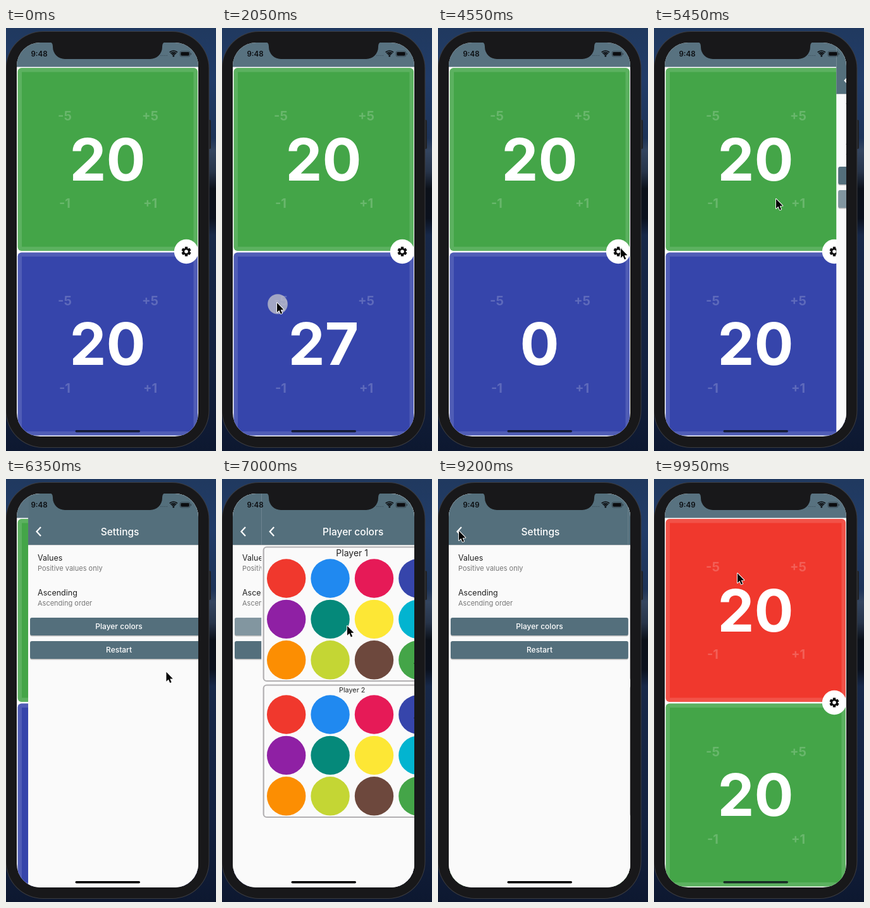
An HTML page with a canvas for the animation above (10000 ms loop, 332x668 px).

```html
<!DOCTYPE html>
<html lang="en">
<head>
<meta charset="utf-8">
<title>Life counter</title>
<style>
html, body { margin: 0; width: 100%; height: 100%; overflow: hidden; background: #14213d; }
canvas { display: block; width: 332px; height: 668px; }
</style>
</head>
<body>
<canvas id="stage"></canvas>
<script>
const W = 332, H = 668, LOOP = 10000;
const canvas = document.getElementById('stage');
const ctx = canvas.getContext('2d');
const ratio = window.devicePixelRatio || 1;
canvas.width = W * ratio;
canvas.height = H * ratio;

const SLATE = '#546f7c', PAPER = '#fafafa';
const RED = '#f0382d', INDIGO = '#3645ab', GREEN = '#44a548';
const PALETTE = [
  RED, '#2089f0', '#e61a57', INDIGO,
  '#8f20a4', '#05897a', '#fde735', '#02b4d0',
  '#fc8e02', '#c4d634', '#6d483d', GREEN
];
const SCREEN = { x: 17, y: 23, w: 287, h: 622 };
const BRUSH = new Path2D('M7 14c-1.66 0-3 1.34-3 3 0 1.31-1.16 2-2 2 .92 1.22 2.49 2 4 2 2.21 0 4-1.79 4-4 0-1.66-1.34-3-3-3z' +
  'm13.71-9.37l-1.34-1.34c-.39-.39-1.02-.39-1.41 0L9 12.25 11.75 15l8.96-8.96c.39-.39.39-1.02 0-1.41z');

// Pointer stops: time, x, y
const POINTER = [
  [150, 300, 480], [600, 228, 433], [790, 228, 433], [1020, 228, 568], [1400, 228, 568],
  [1900, 87, 434], [3200, 87, 434], [3440, 92, 568], [3860, 92, 568],
  [4400, 289, 348], [4710, 289, 348], [5010, 193, 270], [5500, 193, 270],
  [5950, 288, 350], [6140, 288, 350], [6640, 198, 232], [7020, 198, 232],
  [7400, 56, 155], [7560, 56, 155], [7960, 264, 499], [8080, 264, 499],
  [8450, 172, 182], [8750, 33, 82], [9440, 33, 82], [9900, 132, 149]
];
// Presses: time, change of the lower counter on release
const HOLD = 90;
const PRESSES = [
  [650, 5], [1050, 1], [1290, 1],
  [2000, -5], [2270, -5], [2540, -5], [2810, -5], [3080, -5],
  [3480, -1], [3720, -1],
  [4600, 0], [5110, 0], [6020, 0], [6725, 0], [7440, 0], [7990, 0], [8800, 0], [9310, 0]
];
const RESET = 5200, PICK_ONE = 7530, PICK_TWO = 8080, NEW_MINUTE = 7600;
const SETTINGS_VISITS = [[4690, 5203], [6110, 9400]];
const COLOR_VISITS = [[6817, 8890]];

const clamp = v => Math.max(0, Math.min(1, v));
const easeOut = u => 1 - (1 - clamp(u)) ** 3;
const smooth = u => u * u * (3 - 2 * u);

// Left offset of a page that slides in from the right
function pageOffset(t, visits) {
  const slide = 400;
  for (const [enter, leave] of visits) {
    if (t < enter || t > leave + slide) continue;
    const closed = t < leave ? 1 - easeOut((t - enter) / slide) : easeOut((t - leave) / slide);
    return closed * SCREEN.w;
  }
  return null;
}

function pointerAt(t) {
  if (t < POINTER[0][0]) return null;
  const i = POINTER.findIndex(stop => stop[0] > t);
  if (i < 0) return POINTER[POINTER.length - 1].slice(1);
  const [t0, x0, y0] = POINTER[i - 1], [t1, x1, y1] = POINTER[i];
  const u = smooth((t - t0) / (t1 - t0));
  return [x0 + (x1 - x0) * u, y0 + (y1 - y0) * u];
}

function lowerCount(t) {
  if (t >= RESET) return 20;
  return PRESSES.reduce((sum, [at, step]) => t >= at + HOLD ? sum + step : sum, 20);
}

function rect(x, y, w, h, color, radius = 0) {
  ctx.beginPath();
  ctx.roundRect(x, y, w, h, radius);
  ctx.fillStyle = color;
  ctx.fill();
}

function disc(x, y, r, color) {
  ctx.beginPath();
  ctx.arc(x, y, r, 0, Math.PI * 2);
  ctx.fillStyle = color;
  ctx.fill();
}

function line(points, color, width) {
  ctx.beginPath();
  points.forEach(([x, y]) => ctx.lineTo(x, y));
  ctx.strokeStyle = color;
  ctx.lineWidth = width;
  ctx.stroke();
}

// Places text with its capitals centred on y
function label(text, x, y, size, color, weight = 400, align = 'center') {
  ctx.font = `${weight} ${size}px Inter, sans-serif`;
  ctx.textAlign = align;
  ctx.fillStyle = color;
  ctx.fillText(text, x, y + size * 0.364);
}

function gradient(stops) {
  const g = ctx.createLinearGradient(0, 0, 0, H);
  stops.forEach(([at, color]) => g.addColorStop(at, color));
  return g;
}

function drawPhone() {
  rect(0, 0, W, H, gradient([
    [0, '#20395f'], [0.12, '#213c68'], [0.26, '#1d3357'], [0.29, '#34455f'], [0.34, '#273449'],
    [0.38, '#0c1119'], [0.45, '#0b111d'], [0.49, '#172848'], [0.8, '#13213f'], [1, '#0d1830']
  ]));
  rect(319, 145, 5, 46, '#202226', 2);
  rect(-0.5, 5, 322, 658, '#3b3c40', 59);
  rect(0.5, 6, 320, 656, '#18181a', 58);
}

function drawGear(x, y) {
  ctx.beginPath();
  for (let i = 0; i < 6; i++) {
    const a = i * Math.PI / 3 + Math.PI / 6;
    [[-0.46, 5.4], [-0.27, 7.8], [0.27, 7.8], [0.46, 5.4]].forEach(([da, r]) =>
      ctx.lineTo(x + r * Math.cos(a + da), y + r * Math.sin(a + da)));
  }
  ctx.closePath();
  ctx.moveTo(x + 2.8, y);
  ctx.arc(x, y, 2.8, 0, Math.PI * 2);
  ctx.fillStyle = '#0b0b0b';
  ctx.fill('evenodd');
}

function drawCard(y, color, count) {
  rect(18.5, y, 284.5, 289, color, 6);
  ctx.beginPath();
  ctx.roundRect(18.5, y, 284.5, 289, 6);
  ctx.rect(25, y + 6.5, 271.5, 276);
  ctx.fillStyle = 'rgba(255,255,255,.13)';
  ctx.fill('evenodd');
  const faint = 'rgba(255,255,255,.2)';
  for (const [dy, step] of [[76, 5], [214, 1]]) {
    label('-' + step, 93, y + dy, 20, faint, 700);
    label('+' + step, 228, y + dy, 20, faint, 700);
  }
  label(count, 160.5, y + 144.5, 92, '#fff', 700);
}

function drawGame(t) {
  rect(17, 23, 287, 622, '#fff');
  rect(17, 23, 287, 38.5, '#587280');
  drawCard(63, t < PICK_ONE ? GREEN : RED, 20);
  drawCard(354.5, t < PICK_TWO ? INDIGO : GREEN, lowerCount(t));
  disc(285, 353, 19.2, '#fff');
  drawGear(285, 353);
}

function drawPage(title) {
  rect(17, 23, 287, 622, PAPER);
  rect(17, 103, 287, 2, 'rgba(0,0,0,.15)');
  rect(17, 23, 287, 81, SLATE);
  line([[37, 76], [30.5, 83], [37, 90]], '#fff', 2.2);
  label(title, 162, 83, 15.5, '#fff', 500);
}

function drawButton(text, y, pressedAt, t) {
  const age = t - pressedAt;
  const glow = age < 0 || age > 900 ? 0 : Math.min(1, age / 90, (900 - age) / 400);
  rect(20, y + 1.5, 281, 28, 'rgba(0,0,0,.25)', 3);
  rect(20, y, 281, 28, SLATE, 3);
  rect(20, y, 281, 28, `rgba(255,255,255,${0.27 * glow})`, 3);
  label(text, 160.5, y + 14, 12, '#fff', 500);
}

function drawSettings(t) {
  drawPage('Settings');
  [['Values', 'Positive values only', 124.5], ['Ascending', 'Ascending order', 179.5]].forEach(([head, note, y]) => {
    label(head, 32, y, 12.5, '#222', 400, 'left');
    label(note, 32, y + 16, 11, '#777', 400, 'left');
  });
  drawButton('Player colors', 219, 6725, t);
  drawButton('Restart', 256, 5110, t);
}

function drawPalette(name, size, titleY, boxY, boxH, firstY, picked) {
  ctx.beginPath();
  ctx.roundRect(20.5, boxY, 280.5, boxH, 5);
  ctx.strokeStyle = '#b2b0b2';
  ctx.lineWidth = 2.2;
  ctx.stroke();
  label(name, 160.5, titleY, size, '#222');
  PALETTE.forEach((color, i) => {
    const x = 56.5 + (i % 4) * 69.4, y = firstY + Math.floor(i / 4) * 64.4;
    disc(x, y, 30.7, color);
    if (i !== picked) return;
    ctx.save();
    ctx.translate(x, y);
    ctx.scale(0.73, 0.73);
    ctx.translate(-11.5, -12);
    ctx.fillStyle = '#0a0a0a';
    ctx.fill(BRUSH);
    ctx.restore();
  });
}

function drawColors(t) {
  drawPage('Player colors');
  drawPalette('Player 1', 14, 117, 107.5, 211.5, 157, t < PICK_ONE ? 11 : 0);
  drawPalette('Player 2', 10.8, 333.5, 325.5, 208.5, 372, t < PICK_TWO ? 3 : 11);
}

function drawShifted(offset, draw, t) {
  if (offset === null) return;
  ctx.save();
  ctx.translate(offset, 0);
  draw(t);
  ctx.restore();
}

function drawStatus(t) {
  const ink = '#0b0d10';
  label(t < NEW_MINUTE ? '9:48' : '9:49', 52.5, 41, 11.5, ink, 600);
  for (let i = 0; i < 4; i++) disc(245 + i * 3.1, 43.5, 0.8, 'rgba(20,30,40,.4)');
  for (const r of [3.8, 6.4, 9]) {
    ctx.beginPath();
    ctx.arc(264.8, 45, r, -Math.PI * 0.74, -Math.PI * 0.26);
    ctx.strokeStyle = ink;
    ctx.lineWidth = 1.7;
    ctx.stroke();
  }
  disc(264.8, 44, 1.5, ink);
  ctx.beginPath();
  ctx.roundRect(275, 36.8, 16, 8.2, 2.5);
  ctx.strokeStyle = 'rgba(11,13,16,.5)';
  ctx.lineWidth = 0.8;
  ctx.stroke();
  rect(276.3, 38.1, 13.4, 5.6, ink, 1.4);
  rect(291.8, 39.5, 1.2, 2.8, 'rgba(11,13,16,.5)', 0.6);
}

function drawNotch() {
  ctx.beginPath();
  ctx.moveTo(69, 22);
  ctx.quadraticCurveTo(74, 23, 74, 29);
  ctx.arcTo(74, 49, 94, 49, 19);
  ctx.arcTo(247, 49, 247, 29, 19);
  ctx.lineTo(247, 29);
  ctx.quadraticCurveTo(247, 23, 252, 22);
  ctx.closePath();
  ctx.fillStyle = '#18181a';
  ctx.fill();
}

function drawPointer(t) {
  const spot = pointerAt(t);
  if (!spot) return;
  const [x, y] = spot;
  if (PRESSES.some(([at]) => t >= at && t < at + HOLD)) {
    disc(x + 1, y + 2, 15.8, 'rgba(190,190,203,.8)');
  }
  ctx.save();
  ctx.translate(x, y);
  ctx.beginPath();
  [[0, 0], [0, 15], [3.4, 11.8], [5.8, 17.4], [8.2, 16.4], [5.8, 10.9], [10.4, 10.7]]
    .forEach(([px, py]) => ctx.lineTo(px, py));
  ctx.closePath();
  ctx.strokeStyle = '#fff';
  ctx.lineWidth = 1.8;
  ctx.lineJoin = 'round';
  ctx.stroke();
  ctx.fillStyle = '#050505';
  ctx.fill();
  ctx.restore();
}

function draw(t) {
  ctx.setTransform(ratio, 0, 0, ratio, 0, 0);
  drawPhone();
  ctx.save();
  ctx.beginPath();
  ctx.roundRect(SCREEN.x, SCREEN.y, SCREEN.w, SCREEN.h, 37);
  ctx.clip();
  const settings = pageOffset(t, SETTINGS_VISITS);
  drawGame(t);
  drawShifted(settings, drawSettings, t);
  drawShifted(pageOffset(t, COLOR_VISITS), drawColors, t);
  drawStatus(t);
  const onPage = settings !== null && settings < 100;
  rect(109.5, 635, 102.5, 3.6, onPage ? '#050505' : 'rgba(12,16,28,.82)', 1.8);
  ctx.restore();
  drawNotch();
  drawPointer(t);
}

const start = performance.now();
function tick() {
  draw((performance.now() - start) % LOOP);
  requestAnimationFrame(tick);
}
tick();
</script>
</body>
</html>
```
